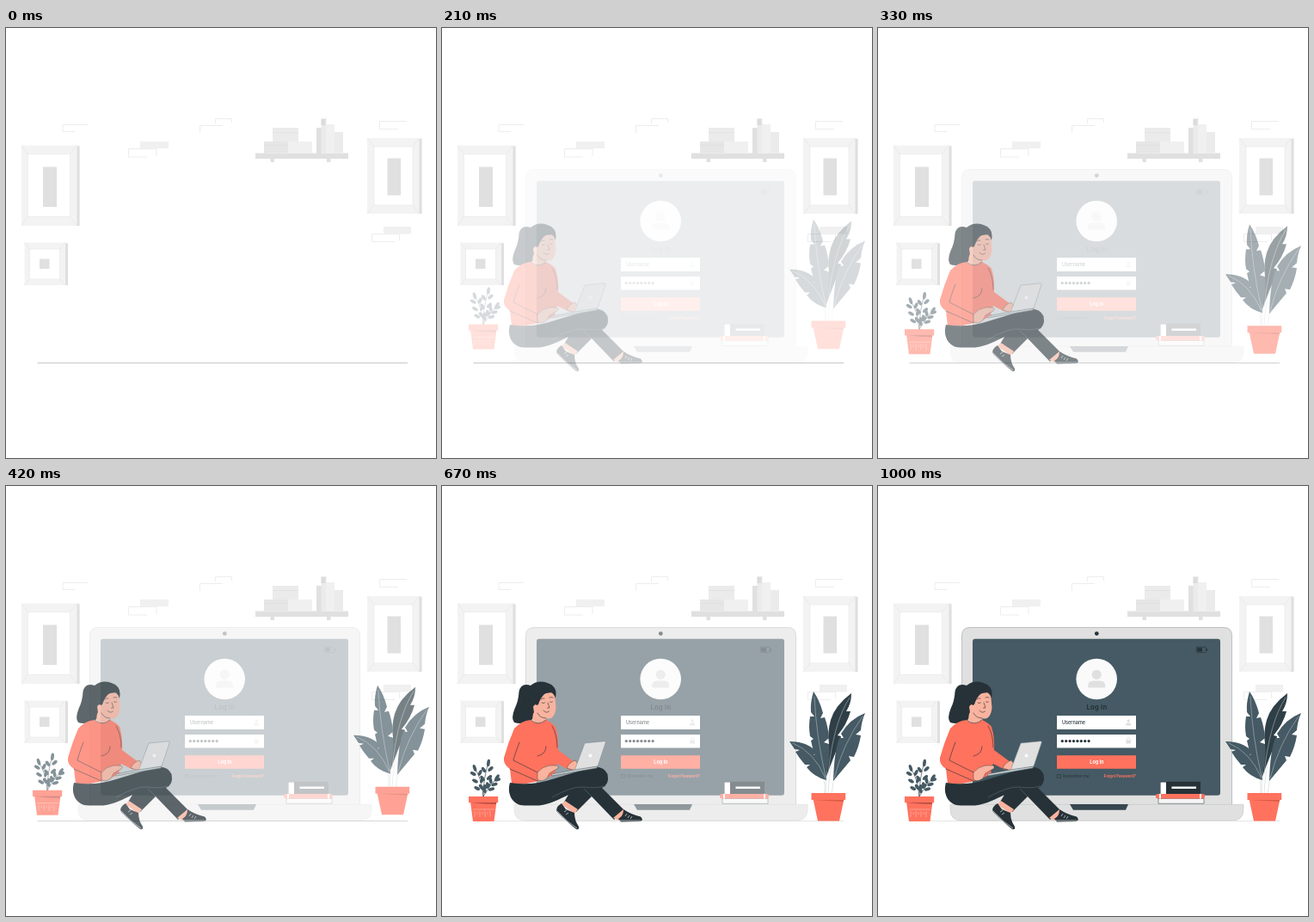
Recreate the animation shown at these times as an HTML page. Size 500x500 px, loop 1040 ms.

```html
<!DOCTYPE html>
<html lang="en">
<head>
<meta charset="utf-8">
<title>Log in scene</title>
<style>
html, body { margin: 0; width: 100%; height: 100%; overflow: hidden; background: #fff; }
svg { display: block; width: 100vw; height: 100vh; }
text { font-family: Inter, "Open Sans", sans-serif; }
.ink { fill: none; stroke: #263238; stroke-width: .6; stroke-linecap: round; stroke-linejoin: round; }
.vein { fill: none; stroke: #c3cbce; stroke-width: .5; stroke-linecap: round; }
.brick { fill: none; stroke: #e6e6e6; stroke-width: .7; }
</style>
</head>
<body>
<svg viewBox="0 0 500 500">
  <g id="wall">
    <g class="brick">
      <path d="M95 112.5H66V120.5H80M175 140V149M142.500 140.500V150H164M142.500 140.500H175"/>
      <path d="M225.500 122V113.500H252M243.500 111V105.500H262.500V110M466 108.500H434.500V117.500H456"/>
      <path d="M425.500 239.500V248.500H452M425.500 239.500H457.500V247"/>
    </g>
    <path fill="#f0f0f0" d="M156 132h33v8h-33zM439 231h32v8.500h-32z"/>
    <g id="pictures"></g>
    <g id="shelf">
      <path fill="#e0e0e0" d="M290 145.500h108v6.500H290zM307.500 152h4.500v4h-4.500zM373 152h4.500v4H373zM361 116h6v29.500h-6z"/>
      <path fill="#ebebeb" d="M310 116h30v16h-30zM382 121h10v24.500h-10zM366.500 105h6v40.500h-6z"/>
      <path fill="#e6e6e6" d="M300 132h28.500v13.500H300z"/>
      <path fill="#f0f0f0" d="M328.500 132H356v13.500h-27.500zM372 112h10v33.500h-10z"/>
      <path fill="#dcdcdc" d="M366.500 106h5v7h-5zM310 121h30v.6h-30zM300 136h28v.6h-28z"/>
    </g>
  </g>
  <path id="floor" fill="none" stroke-width=".8" d="M36.500 389.500H467"/>

  <g id="computer">
    <path fill="#e0e0e0" stroke="#8b9295" stroke-width=".5" d="M97.500 371V174q0-9.500 9.500-9.500H402q9.500 0 9.500 9.500V371z"/>
    <path fill="#e0e0e0" stroke="#bcc0c2" stroke-width=".5" d="M84 370.300H425V376q0 13-13 13H97q-13 0-13-13z"/>
    <path fill="#37474f" d="M223 370H291L288 376.800H227z"/>
    <circle cx="254.300" cy="171.600" r="2.400" fill="#263238"/>
    <rect x="110" y="177.700" width="288" height="182" rx="3" fill="#455a64"/>
    <rect x="370.300" y="187.300" width="11" height="6.200" rx="1" class="ink"/>
    <path fill="#263238" d="M371.200 188.200h5.800v4.400h-5.800zM382 189h1v2.800h-1z"/>
    <circle cx="254.200" cy="224.500" r="23.800" fill="#fafafa"/>
    <g fill="#e0e0e0">
      <circle cx="254.200" cy="219.300" r="5.600"/>
      <path d="M244.200 234.500v-2q0-6 6-6h8q6 0 6 6v2z"/>
    </g>
    <text x="254.500" y="259.600" text-anchor="middle" font-size="7.600" font-weight="700" letter-spacing=".25" fill="#263238">Log In</text>
    <path fill="#fff" d="M208 267h92v16h-92zM208 289h92v15.600h-92z"/>
    <text x="214" y="276.700" font-size="5.500" font-weight="500" fill="#263238">Username</text>
    <g fill="#e0e0e0">
      <circle cx="291.200" cy="273" r="1.700"/>
      <path d="M288 278.500q0-3.300 3.200-3.300t3.200 3.300zM288.400 295.500h5.600v4h-5.600z"/>
      <path fill="none" stroke="#e0e0e0" stroke-width=".8" d="M289.500 296v-1.500q0-1.700 1.700-1.700t1.700 1.700v1.500"/>
    </g>
    <g id="dots" fill="#263238"></g>
    <path fill="#ff725e" d="M208 313.200h92v15.500h-92z"/>
    <text x="254.400" y="323" text-anchor="middle" font-size="5.500" font-weight="700" fill="#fff">Log In</text>
    <rect x="208.700" y="335.700" width="3.600" height="3.600" class="ink"/>
    <text x="215" y="339.100" font-size="4.450" fill="#263238">Remember me</text>
    <text x="300" y="339.100" text-anchor="end" font-size="4.250" font-weight="700" fill="#ff725e">Forgot Password?</text>
    <path fill="#263238" d="M328 343.700h47V358h-47z"/>
    <path fill="#fff" d="M328.500 344.500h6.500V358h-6.500zM341.500 349.500H370v2.500h-28.500z"/>
    <path fill="#f5f5f5" stroke="#263238" stroke-width=".5" d="M326 363.500h53v5.800h-53z"/>
    <rect x="323" y="358" width="57" height="5.600" rx="2" fill="#ff725e"/>
    <path fill="#fff" d="M327 358h2v5.600h-2zM374 358h2v5.600h-2z"/>
  </g>

  <g id="plants">
    <path class="vein" d="M446 358Q447 340 445 326M449 358Q450 335 455 315M453 358L456 338M445 358Q446 340 440 330"/>
    <path fill="#2f3f47" d="M476 241Q457 255 452 272Q448 286 450 300L447 338Q455 315 462 300L464 291L460 290Q471 277 475 262L470 262Q476 253 476 241z"/>
    <g fill="#455a64">
      <path d="M432 239Q428 252 429 263L433 268L428 268Q426 280 428 291L432 294L429 296Q432 314 446 340Q452 315 450 300L444 298L450 293Q449 280 445 269L440 270L443 264Q439 249 432 239z"/>
      <path d="M492 264Q474 271 464 288L467 293L462 293Q456 308 455 343Q465 331 475 319L473 314L479 315Q485 303 487 290L481 289L487 284Q488 273 492 264z"/>
      <path d="M404 297Q425 297 435 309L432 313L437 311Q447 324 447 342Q432 338 424 327L428 324L422 324Q415 316 411 309L416 307L410 306z"/>
    </g>
    <path class="vein" d="M433 245Q435 290 446 338M474 246Q455 275 449 335M489 268Q466 300 456 340M408 299Q433 309 446 340"/>
    <path fill="#ff725e" d="M431.500 364H467.500L462 389.600H437zM429.500 357h39.700v8h-39.700z"/>
    <path fill="#dc5a48" d="M431.800 365H467L466.500 367z"/>
    <path class="ink" stroke="#455a64" d="M48 361Q46 338 37 327M48 361Q48 340 54 321M48 361Q54 350 65 338"/>
    <g id="foliage" fill="#455a64"></g>
    <path fill="#ff725e" d="M33 367H63.500L60.500 390H36zM31 361h34.200v7.200H31z"/>
    <path fill="#b94f43" d="M33.500 368H63.200L62.800 370Q48 370 33.500 368z"/>
    <path fill="none" stroke="#ffc4b8" stroke-width=".6" d="M36 376H61M38 378v7m3-6v3m3-4v7m3-6v3m3-4v7m3-6v3m3-4v7"/>
  </g>

  <g id="woman">
    <path fill="#263238" d="M103 232Q92 228 89.500 239Q89 250 84.500 259Q80 270 84 275Q93 278 104 272L113 263L132 246Q135 233 122 229Q112 225 103 232z"/>
    <path fill="#f9b39e" d="M107 255L105 272Q113 282 122 273L121 270Q131 273 132.500 258L131 241Q124 239 116 243Q113 250 111 255Q107 252 106 256Q106 262 110 263z"/>
    <path fill="#263238" d="M103 233Q115 224 127 231Q133 236 132 246Q129 240 124 238Q117 242 113 251Q112 256 109 254Q104 255 107 263L103 270Q97 250 103 233z"/>
    <path class="ink" d="M115 248q2-2 4-1M125 246q2-1 4 0M116 252q2 1.500 3.500 0M125.500 251q2 1 3 0M123 252l2 6h-2.500M118 261q3 4 6.500 1M111 264q3 6 10 6"/>
    <path fill="#ff725e" d="M103 272Q92 273 84 282Q77 298 72 316Q71 324 79 329L81 346Q103 349 132 335Q130 329 134 323L148 330L154 321L135 307Q136 293 132 280Q128 275 121 272Q112 280 103 272z"/>
    <path class="ink" d="M103 272Q112 280 121 272M90 298Q85 311 83 319L111 333M79 329L111 343M111 314Q121 312 121 303M128 279Q134 289 134 304"/>
    <path fill="#263238" d="M79 345C75 358 82 371.500 96 371.500H113C126 370 137 364 147 359L141 369L156 379L174 361L200 388L213 378L186 351Q195 347 192.500 335Q188 325 174 327L128 341Q104 349 79 345z"/>
    <path class="ink" stroke="#78868c" style="stroke:#66757c;stroke-width:.5" d="M128 362Q151 349 164 350Q180 352 188 349M174 361L165 352"/>
    <path fill="#f9b39e" d="M139 370L143 366L158 376L154 381zM199 386L211 376L215 380L206 389z"/>
    <path fill="#263238" d="M139 369L144 376L154 380Q154 389 159 396Q160 400 156 399Q146 391 134 379Q131 374 139 369zM205 387Q211 384 211 376Q220 382 231 384.500Q235 389 230 390L208 390.500z"/>
    <path fill="none" stroke="#fff" stroke-width=".6" d="M142 379l3-2m-1 5l3-2m-13-2Q146 391 157 398M213 384l2-3m1 5l2-3m1 4l2-3m-15 5H231"/>
    <path fill="#f9b39e" stroke="#263238" stroke-width=".4" d="M111 333Q117 326 125 325L134 325Q137 328 132 330L125 334L122 340Q115 345 111 341zM145 328Q148 321 155 319L158 323L155 331z"/>
    <path fill="#e0e0e0" stroke="#78868c" stroke-width=".5" d="M166 299L189 296.800Q191 297 190 299L181 326L154 331z"/>
    <path fill="#c8cccd" stroke="#455a64" stroke-width=".5" d="M127 335L154 330L181 326L180 328L128 337z"/>
    <circle cx="172.500" cy="313.500" r="2" fill="#fafafa"/>
  </g>
</svg>
<script>
const LOOP = 1040;
const STEPS_PER_MS = 24 / 1000;
const byId = id => document.getElementById(id);
const rect = (x, y, w, h, fill) =>
  `<rect x="${x}" y="${y}" width="${w}" height="${h}" fill="${fill}"/>`;

// Framed picture: outer box, then inset of the mount, then the artwork.
function picture(x, y, w, h, [mx, my, mw, mh], [ax, ay, aw, ah]) {
  const right = x + w - 3;
  const corners = `M${x} ${y}L${mx} ${my}M${right} ${y}L${mx + mw} ${my}` +
    `M${x} ${y + h}L${mx} ${my + mh}M${right} ${y + h}L${mx + mw} ${my + mh}`;
  return rect(x, y, w, h, '#f3f3f3') + rect(right, y + 1, 3, h - 1, '#dfdfdf') +
    `<path d="${corners}" stroke="#e2e2e2" stroke-width=".6"/>` +
    `<rect x="${mx}" y="${my}" width="${mw}" height="${mh}" fill="#fff" stroke="#e6e6e6" stroke-width=".6"/>` +
    rect(ax, ay, aw, ah, '#e0e0e0');
}

byId('pictures').innerHTML =
  picture(18, 136.5, 67.5, 93.5, [25.5, 146.5, 49, 73], [43, 161.5, 16, 46.5]) +
  picture(21.5, 249.5, 50.5, 49.5, [27.5, 257, 35, 35], [39, 268.5, 11.5, 11.5]) +
  picture(420, 128, 63.5, 88, [428, 138, 45, 68], [443.5, 151.5, 15.5, 43]);

byId('dots').innerHTML = Array.from({ length: 8 }, (_, i) =>
  `<circle cx="${214.3 + i * 4.4}" cy="296.600" r="1.600"/>`).join('');

function leaf(x, y, angle, size = 4.2) {
  return `<ellipse cx="${x}" cy="${y}" rx="1.900" ry="${size}" transform="rotate(${angle} ${x} ${y})"/>`;
}

// Leaf pairs along a stem, closed by one leaf at the tip.
function sprig(x0, y0, x1, y1, tilt) {
  let out = leaf(x1, y1, tilt);
  for (let i = 0; i < 3; i++) {
    const u = .25 + i * .25;
    const x = x0 + (x1 - x0) * u, y = y0 + (y1 - y0) * u;
    out += leaf(x - 4, y - 2, tilt - 42, 3.7) + leaf(x + 4, y - 3, tilt + 42, 3.7);
  }
  return out;
}
byId('foliage').innerHTML = sprig(47, 362, 38, 328, -18) +
  sprig(48, 362, 54, 322, 8) + sprig(50, 361, 64, 339, 32);

function along(points, t) {
  const i = points.findIndex(([time]) => time >= t);
  if (i < 0) return 1;
  if (i === 0) return points[0][1];
  const [t0, v0] = points[i - 1], [t1, v1] = points[i];
  return v0 + (v1 - v0) * (t - t0) / (t1 - t0);
}

const plantFade = [[110, 0], [210, .22], [330, .48], [500, .82], [665, 1]];
const womanFade = [[110, 0], [210, .25], [330, .57], [500, .9], [625, 1]];

function draw(time) {
  const step = Math.floor(time * STEPS_PER_MS + .1);
  const t = step < 3 ? 0 : step / STEPS_PER_MS;
  const plant = along(plantFade, t);
  byId('computer').setAttribute('opacity', Math.min(1, (t / 1000) ** 1.45));
  byId('plants').setAttribute('opacity', plant);
  byId('plants').setAttribute('transform', `translate(0 ${-21 * (1 - plant)})`);
  byId('woman').setAttribute('opacity', along(womanFade, t));
  const grey = 185 + 38 * Math.max(0, Math.min(1, (t - 210) / 350));
  byId('floor').setAttribute('stroke', `rgb(${grey},${grey},${grey})`);
}

const start = performance.now();
function tick() {
  draw((performance.now() - start) % LOOP);
  requestAnimationFrame(tick);
}
tick();
</script>
</body>
</html>
```
